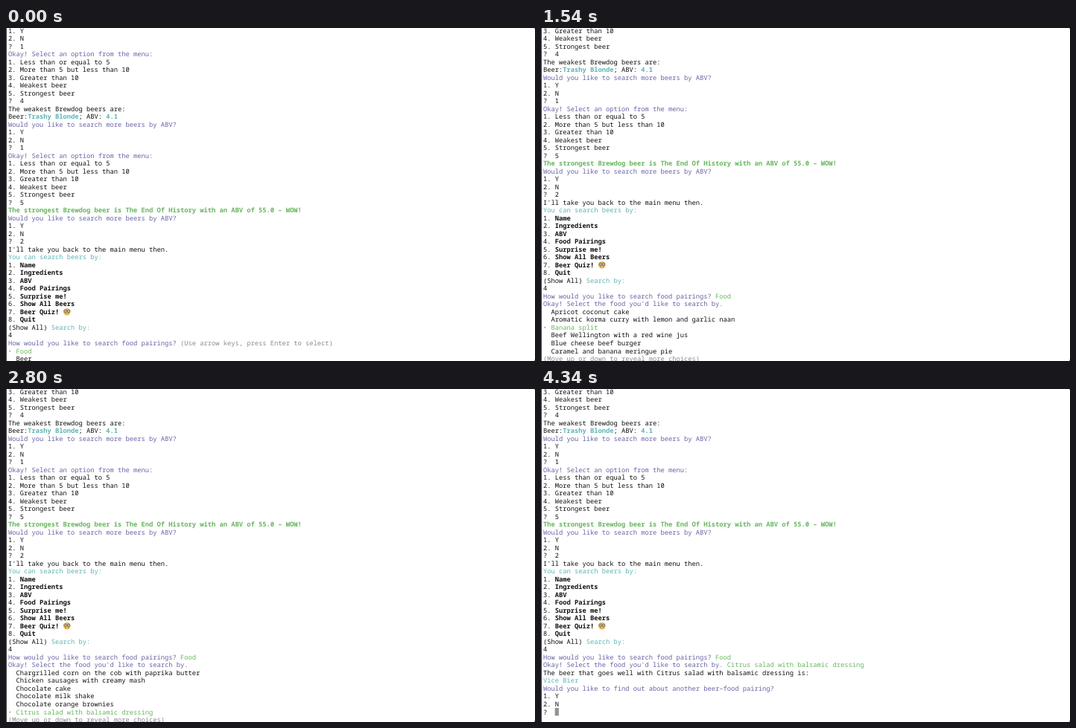
These frames come from a looping animation (710 px wide and 448 px high, 4480 ms). An HTML page:

```html
<!DOCTYPE html>
<html lang="en">
<head>
<meta charset="utf-8">
<title>Beer search terminal</title>
<style>
  html, body { margin: 0; width: 100%; height: 100%; overflow: hidden; background: #fff; }
  svg { display: block; }
  text {
    font: 8.75px "Noto Sans Mono", "DejaVu Sans Mono", monospace;
    text-rendering: geometricPrecision;
    white-space: pre;
    fill: #111;
  }
  .bold { font-weight: 700; }
  .purple { fill: #6763a5; }
  .teal { fill: #5fb3b5; }
  .green { fill: #67b65e; }
  .gray { fill: #8b8b8b; }
</style>
</head>
<body>
<svg width="710" height="448" viewBox="0 0 710 448">
  <g id="screen"></g>
  <path d="M.5 0V448M709 0h1v1M709 447h1" stroke="#444" fill="none"/>
</svg>
<script>
const LOOP = 4480, TICK = 70;
const LEFT = 2.9, CELL = 5.25, LINE = 10.51, BASELINE = 6.6;
const PAGE = 6, FIRST_KEY = 1050, REPEAT_START = 1540, REPEAT = 55, LAST_FOOD = 12;

const paint = style => text => `<tspan class="${style}">${text}</tspan>`;
const [purple, teal, green, gray, bold] = ["purple", "teal", "green", "gray", "bold"].map(paint);
const tealBold = paint("teal bold"), greenBold = paint("green bold");

const foods = [
  "Apricot coconut cake", "Aromatic korma curry with lemon and garlic naan",
  "Banana split", "Beef Wellington with a red wine jus", "Blue cheese beef burger",
  "Caramel and banana meringue pie", "Caramel toffee cake",
  "Chargrilled corn on the cob with paprika butter", "Chicken sausages with creamy mash",
  "Chocolate cake", "Chocolate milk shake", "Chocolate orange brownies",
  "Citrus salad with balsamic dressing"
];
const yesNo = ["1. Y", "2. N"];
const abvMenu = [
  purple("Okay! Select an option from the menu:"),
  "1. Less than or equal to 5", "2. More than 5 but less than 10",
  "3. Greater than 10", "4. Weakest beer", "5. Strongest beer"
];
const searchMore = [purple("Would you like to search more beers by ABV?"), ...yesNo];
const mainMenu = ["Name", "Ingredients", "ABV", "Food Pairings", "Surprise me!",
  "Show All Beers", "Beer Quiz!", "Quit"].map((name, i) => `${i + 1}. ${bold(name)}`);

const history = [
  ...yesNo, "?  1", ...abvMenu, "?  4",
  "The weakest Brewdog beers are:",
  `Beer:${tealBold("Trashy Blonde")}; ABV: ${tealBold("4.1")}`,
  ...searchMore, "?  1", ...abvMenu, "?  5",
  greenBold("The strongest Brewdog beer is The End Of History with an ABV of 55.0 – WOW!"),
  ...searchMore, "?  2",
  "I'll take you back to the main menu then.",
  teal("You can search beers by:"), ...mainMenu,
  `(Show All) ${teal("Search by:")}`, "4"
];
const quizLine = history.findIndex(line => line.includes("Beer Quiz!"));

const option = (text, active) => active ? green("‣ " + text) : "  " + text;
const howQuestion = purple("How would you like to search food pairings? ");
const foodQuestion = purple("Okay! Select the food you'd like to search by. ");

function foodIndex(t) {
  if (t < FIRST_KEY) return 0;
  if (t < REPEAT_START) return 1;
  return Math.min(LAST_FOOD, 2 + Math.floor((t - REPEAT_START) / REPEAT));
}

function prompt(t) {
  if (t < 70) return [
    howQuestion + gray("(Use arrow keys, press Enter to select)"),
    option("Food", true), option("Beer", false)
  ];
  const lines = [howQuestion + green("Food")];
  if (t < 3150) {
    const active = foodIndex(t), first = Math.max(0, active - PAGE + 1);
    lines.push(foodQuestion + (active ? "" : gray("(Use arrow keys, press Enter to select)")));
    foods.slice(first, first + PAGE).forEach((food, i) => lines.push(option(food, first + i === active)));
    lines.push(gray("(Move up or down to reveal more choices)"));
    return lines;
  }
  const choice = foods[LAST_FOOD];
  lines.push(foodQuestion + green(choice), `The beer that goes well with ${choice} is:`, teal("Vice Bier"));
  if (t >= 4200) lines.push(
    purple("Would you like to find out about another beer–food pairing?"), ...yesNo, "?");
  return lines;
}

const nerdFace = y => `<g transform="translate(81.8 ${y})">
  <circle r="4.8" fill="#efbd55"/>
  <path d="M-2.6 1.6Q0 5 2.6 1.6Z" fill="#8a5a35"/>
  <path d="M-.9 1.7h1.8v1.2h-1.8z" fill="#fff"/>
  <g fill="#e9e6dc" stroke="#655947" stroke-width=".9">
    <circle cx="-2.2" cy="-1" r="1.8"/><circle cx="2.2" cy="-1" r="1.8"/>
  </g>
  <path d="M-2.2-1h.1M2.2-1h.1" stroke="#4b3426" stroke-linecap="round"/></g>`;

function cursor(t, scroll) {
  if (t < 3150) return "";
  const [column, row] = t < 4200 ? [0, 38] : [3, 41];
  return `<rect x="${LEFT + column * CELL}" y="${row * LINE - 1.9}" width="${CELL}" height="${LINE}" fill="#929292"/>`;
}

function render(t) {
  const scroll = t < 70 ? 0 : 6;
  const lines = [...history, ...prompt(t)].slice(scroll);
  return lines.map((line, i) => `<text x="${LEFT}" y="${i * LINE + BASELINE}">${line}</text>`).join("")
    + nerdFace((quizLine - scroll) * LINE + 3.5) + cursor(t);
}

const screen = document.getElementById("screen");
let shown = "";
function frame() {
  const t = Math.floor(performance.now() % LOOP / TICK) * TICK;
  const markup = render(t);
  if (markup !== shown) screen.innerHTML = shown = markup;
  requestAnimationFrame(frame);
}
frame();
</script>
</body>
</html>
```
